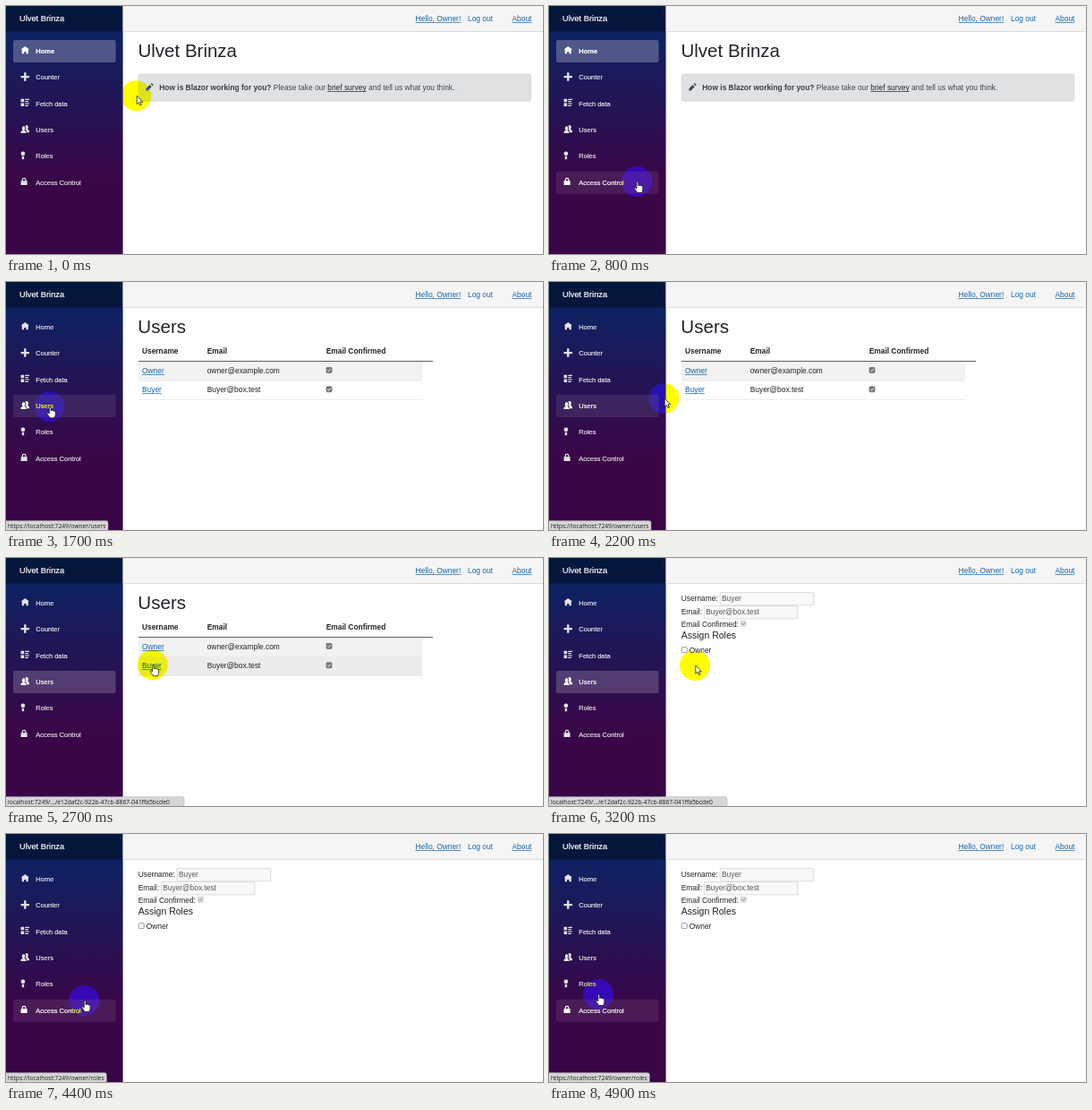
An HTML page with a canvas for the animation above (5000 ms loop, 600x277 px).

```html
<!DOCTYPE html>
<html lang="en">
<head>
<meta charset="utf-8">
<title>Ulvet Brinza</title>
<style>
html, body { margin: 0; width: 100%; height: 100%; overflow: hidden; background: #fff; }
canvas { display: block; width: 600px; height: 277px; }
</style>
</head>
<body>
<canvas id="stage"></canvas>
<script>
const W = 600, H = 277, SIDE = 130.6, LOOP = 5000, STEP = 100;
const canvas = document.getElementById('stage');
const ctx = canvas.getContext('2d');
const ratio = window.devicePixelRatio || 1;
canvas.width = W * ratio;
canvas.height = H * ratio;

const SANS = '"Liberation Sans", Arial, sans-serif';
const STATUS = '"Open Sans", "Noto Sans", sans-serif';
const INK = '#212529', LINK = '#0f68b0';
const BRAND = 'Ulvet Brinza';

const ICONS = {
  home: 'M4 0L0 3h1v4h2V5h2v2h2V3h1z',
  plus: 'M3 0v3H0v2h3v3h2V5h3V3H5V0z',
  list: 'M0 0v3h3V0zM4 0v1h4V0zM4 2v1h3V2zM0 4v3h3V4zM4 4v1h4V4zM4 6v1h3V6z',
  people: 'M5.5 0C4.9 0 4.4.5 4.2 1.1c.6.7.8 1.7.5 2.7l-.4.7 1.2.9V7H8V5.2L6.6 4.3 6.5 3.7C7.5 2.5 7 0 5.5 0z' +
    'M2.6 1C1 1 .7 3.4 1.6 4.6v.5L0 6v1.5h5V6l-1.5-.9v-.5C4.5 3.4 4.2 1 2.6 1z',
  badge: 'M2 0a2 2 0 1 0 .01 0zM1 4.6V8l1-1 1 1V4.6z',
  lock: 'M3 0a2 2 0 0 0-2 2v1H0v4h6V3H5V2a2 2 0 0 0-2-2zm0 1a1 1 0 0 1 1 1v1H2V2a1 1 0 0 1 1-1z',
  pencil: 'M6 0L5 1l2 2 1-1zM4 2L0 6v2h2l4-4z'
};
for (const k in ICONS) ICONS[k] = new Path2D(ICONS[k]);

const ARROW = new Path2D('M0 0V9.2L2.1 7.3 3.6 10.6 5.1 10 3.7 6.8H6.5z');
const HAND = new Path2D('M-.9 .9C-.9-.2 .9-.2 .9 .9V4.9L1.2 4.2C1.6 3.6 2.8 3.8 2.8 4.7' +
  'C3.2 4.2 4.5 4.4 4.5 5.2C5 4.8 6 5.1 6 6V9.3C6 10.4 5.1 11 5.1 12.6H-.3' +
  'C-.5 11-3.3 8.7-3.3 7.4C-3.2 6.4-1.9 6.7-.9 8z');

const NAV = [['Home', 'home'], ['Counter', 'plus'], ['Fetch data', 'list'],
  ['Users', 'people'], ['Roles', 'badge'], ['Access Control', 'lock']];

// Pointer path: time, x, y
const PATH = [
  [0, 145.4, 100.3], [200, 503, 26], [400, 500, 27], [600, 163, 154], [800, 98, 196],
  [1000, 98, 196], [1300, 47.8, 149], [1500, 46, 140], [2000, 52, 138], [2200, 128.4, 130],
  [2400, 150, 122], [2600, 164, 119], [3200, 163, 120], [3600, 167, 117], [3900, 151, 128],
  [4200, 78, 166], [4500, 92, 196], [4700, 90, 195], [4900, 55, 179]
];

// Start time, menu row
const ACTIVE = [[0, 0], [1600, -1], [2500, 3], [3300, -1]];
const HOVER = [[0, -1], [700, 5], [1200, 4], [1400, 3], [2500, -1], [4100, 4], [4300, 5]];

const HOST = 'https://localhost:7249/';
const BAR = [
  [0, ''], [300, HOST + 'Identity/Account/Manage'], [500, ''], [900, HOST + 'owner/accesscontrol'],
  [1200, ''], [1600, HOST + 'owner/users'], [2400, ''],
  [2700, 'localhost:7249/.../e12daf2c-922b-47cb-8867-041ffa5bcde0'], [3500, ''],
  [4200, HOST + 'owner/roles'], [4500, HOST + 'owner/accesscontrol'], [4900, HOST + 'owner/roles']
];

function current(list, t) {
  let value = list[0][1];
  for (const [start, v] of list) if (t >= start) value = v;
  return value;
}

function pointer(t) {
  const i = PATH.findIndex(p => p[0] >= t);
  if (i <= 0) return PATH[0].slice(1);
  const [t0, x0, y0] = PATH[i - 1], [t1, x1, y1] = PATH[i];
  const k = (t - t0) / (t1 - t0);
  return [x0 + (x1 - x0) * k, y0 + (y1 - y0) * k];
}

function box(x, y, w, h, fill) {
  ctx.fillStyle = fill;
  ctx.fillRect(x, y, w, h);
}

function panel(x, y, w, h, r, fill, line, width = 0.6) {
  ctx.beginPath();
  ctx.roundRect(x, y, w, h, r);
  ctx.fillStyle = fill;
  ctx.fill();
  if (line) {
    ctx.strokeStyle = line;
    ctx.lineWidth = width;
    ctx.stroke();
  }
}

function text(str, x, y, color = INK, size = 8.38, weight = 400, family = SANS) {
  ctx.font = `${weight} ${size}px ${family}`;
  ctx.fillStyle = color;
  ctx.fillText(str, x, y);
  return x + ctx.measureText(str).width;
}

// Light text on dark, thickened a little
function lightText(str, x, y, color, size, weight) {
  text(str, x, y, color, size, weight);
  ctx.strokeStyle = color;
  ctx.lineWidth = 0.2;
  ctx.strokeText(str, x, y);
}

function link(str, x, y, color = LINK) {
  const end = text(str, x, y, color);
  box(x, y + 1, end - x, 0.7, color);
  return end;
}

function icon(name, x, y, scale, color) {
  ctx.save();
  ctx.translate(x, y);
  ctx.scale(scale, scale);
  ctx.fillStyle = color;
  ctx.fill(ICONS[name]);
  ctx.restore();
}

function check(x, y, fill, line, tick) {
  panel(x, y, 6, 6, 1, fill, line, 0.7);
  if (!tick) return;
  ctx.beginPath();
  ctx.moveTo(x + 1.2, y + 3.1);
  ctx.lineTo(x + 2.5, y + 4.4);
  ctx.lineTo(x + 4.9, y + 1.6);
  ctx.strokeStyle = tick;
  ctx.lineWidth = 0.9;
  ctx.stroke();
}

function field(str, x, y) {
  panel(x, y, 104.5, 14.4, 0.5, '#f8f8f8', '#c9c9c9');
  text(str, x + 1.8, y + 9.9, '#5a5a5a');
}

function sidebar(t) {
  const g = ctx.createLinearGradient(0, 0, 0, H);
  g.addColorStop(0, '#052767');
  g.addColorStop(0.7, '#3a0647');
  box(0, 0, SIDE, H, g);
  box(0, 0, SIDE, 28.5, 'rgba(0,0,0,.4)');
  lightText(BRAND, 15, 17.3, '#fff', 9.3);

  const active = current(ACTIVE, t);
  const hover = current(HOVER, t);
  NAV.forEach(([label, name], i) => {
    const y = 50 + i * 29.35;
    const lit = i === active || i === hover;
    if (lit) {
      const alpha = i !== active ? 0.085 : i ? 0.19 : 0.25;
      panel(8, y - 12, 114.6, 25, 2, `rgba(255,255,255,${alpha})`);
    }
    const color = lit ? '#fff' : '#e2e2e6';
    const bold = i === 0 && active === 0;
    icon(name, 16.6, y - 5, 1.18, color);
    lightText(label, 33.3, y + 2.8, color, 7.5, bold ? 700 : 400);
  });
}

function header() {
  box(SIDE, 0, W - SIDE, 28, '#f6f5f6');
  box(SIDE, 28, W - SIDE, 0.8, '#d6d5d5');
  link('Hello, Owner!', 457.5, 17);
  text('Log out', 516, 17, LINK);
  link('About', 565.5, 17);
}

function homePage() {
  text(BRAND, 147.5, 57.3, INK, 20.5);
  panel(148.2, 76, 438.5, 30.3, 2, '#dfe1e3', '#cdd0d3');
  icon('pencil', 156.4, 86, 1.05, '#41464b');
  let x = text('How is Blazor working for you?', 171.3, 94, '#3b4045', 8.38, 700);
  x = text(' Please take our ', x, 94, '#41464b');
  x = link('brief survey', x, 94, INK);
  text(' and tell us what you think.', x, 94, '#41464b');
}

function usersPage(t) {
  text('Users', 147.3, 57.3, INK, 20.6);
  [['Username', 152], ['Email', 224.7], ['Email Confirmed', 357.7]]
    .forEach(([label, x]) => text(label, x, 80.3, INK, 8.38, 700));
  box(148, 88, 329, 0.9, '#4a4e52');
  const rows = [['Owner', 'owner@example.com'], ['Buyer', 'Buyer@box.test']];
  rows.forEach(([name, mail], i) => {
    const y = 89 + i * 21.4;
    if (i === 0) box(148, y, 317, 21, '#f2f2f2');
    if (i === 1 && t >= 2500) box(148, y, 317, 21, '#ececec');
    box(148, y + 20.9, 317, 0.6, '#dee2e6');
    link(name, 152, y + 13);
    text(mail, 224.7, y + 13);
    check(358, y + 6.4, '#767676', '#686868', '#fff');
  });
}

function detailPage() {
  text('Username:', 147.7, 48.2);
  field('Buyer', 191.2, 38.4);
  text('Email:', 147.7, 62.8);
  field('Buyer@box.test', 173.4, 53.4);
  text('Email Confirmed:', 147.7, 77);
  check(214.3, 70.2, '#dcdcdc', '#cbcbcb', '#8a8a8a');
  text('Assign Roles', 147.7, 90.2, INK, 10.5);
  check(148.2, 99.6, '#fff', '#767676');
  text('Owner', 156.7, 106);
}

function statusBar(t) {
  const str = current(BAR, t);
  if (!str) return;
  ctx.font = `6.7px ${STATUS}`;
  const width = str.startsWith('https') ? ctx.measureText(str).width + 4.5 : 199;
  panel(-1, 266.8, width + 1, 12, [0, 2, 0, 0], '#d6d6d8', '#b5b5b8');
  text(str, 2, 274.6, '#1c1d20', 6.7, 400, STATUS);
}

function drawPointer(t) {
  const [x, y] = pointer(t);
  ctx.save();
  ctx.globalCompositeOperation = 'difference';
  ctx.fillStyle = '#00f';
  ctx.beginPath();
  ctx.arc(x, y, 17, 0, Math.PI * 2);
  ctx.fill();
  ctx.restore();

  const onMenu = x > 8 && x < 123;
  const onHello = x > 458 && y < 30;
  const onRow = t >= 2600 && t < 3100;
  const hand = onMenu || onHello || onRow;
  ctx.save();
  ctx.translate(x + 0.8, y);
  ctx.fillStyle = '#fff';
  ctx.strokeStyle = '#111';
  ctx.lineWidth = 0.75;
  ctx.lineJoin = 'round';
  const shape = hand ? HAND : ARROW;
  ctx.fill(shape);
  ctx.stroke(shape);
  ctx.restore();
}

function draw(t) {
  ctx.setTransform(ratio, 0, 0, ratio, 0, 0);
  box(0, 0, W, H, '#fefefe');
  sidebar(t);
  header();
  if (t < 1600) homePage();
  else if (t < 3100) usersPage(t);
  else detailPage();
  statusBar(t);
  drawPointer(t);
}

const begin = performance.now();
function tick() {
  const t = (performance.now() - begin) % LOOP;
  draw(Math.floor(t / STEP) * STEP);
  requestAnimationFrame(tick);
}
tick();
</script>
</body>
</html>
```
